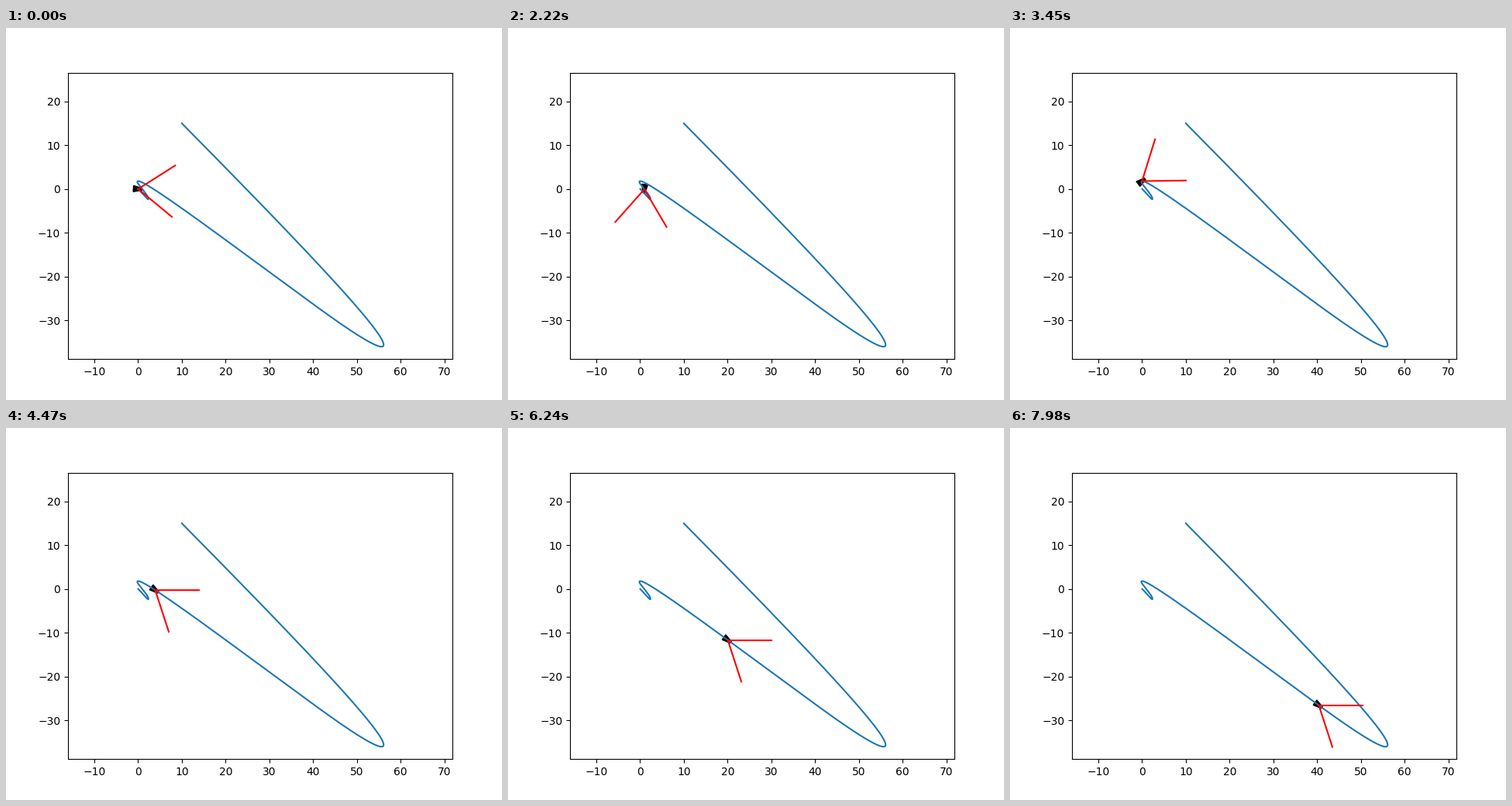
Recreate the animation shown at these times as a matplotlib script. Size 640x480 px, loop 8 s.

```python
import numpy as np
import matplotlib.pyplot as plt
from matplotlib.animation import FuncAnimation

STEP = 30            # the pose changes every 30 ms
TICK = 20            # timer interval in ms
LOOP = 8000
VIEW = 10.0          # length of the view rays
HALF = np.radians(36)

# few key poses: time (s), x, y, and velocity there
KEYS = np.array([
    (0.00, 0.03, 0.00, 2.6, -2.6),
    (1.14, 2.38, -2.27, 0.0, 1.4),
    (3.45, 0.00, 1.80, 1.2, 0.2),
    (8.00, 40.64, -26.77, 11.4, -8.3),
    (16.00, 10.00, 15.00, -16.7, 16.9),
])

# robot outline in its own frame, nose along +x
BODY = np.array([(-1.1, 0.7), (0.85, 0.22), (0.85, -0.22), (-1.1, -0.7)])


def place(s):
    """Position on the cubic between the two key poses around time s."""
    i = np.clip(np.searchsorted(KEYS[:, 0], s, side="right") - 1,
                0, len(KEYS) - 2)
    a, b = KEYS[i], KEYS[i + 1]
    h = b[..., :1] - a[..., :1]
    u = (np.asarray(s)[..., None] - a[..., :1]) / h
    p, v, q, w = a[..., 1:3], a[..., 3:], b[..., 1:3], b[..., 3:]
    ease = u * u * (3 - 2 * u)
    return (p + (q - p) * ease
            + h * u * (1 - u) * ((1 - u) * v - u * w))


def heading(s):
    """Settle near -57 degrees, then swing clockwise by almost a full turn."""
    u = np.clip((s - 1.69) / 2.51, 0, 1)
    settle = -57 + 53.4 * np.exp(-2.2 * s)
    return np.radians(settle - 339 * u * u * (3 - 2 * u))


fig, ax = plt.subplots(figsize=(6.4, 4.8), dpi=100)
ax.set_xlim(-16.012, 71.853)
ax.set_ylim(-38.884, 26.59)
ax.plot(*place(np.linspace(0, KEYS[-1, 0], 1600)).T, color="tab:blue")
body, = ax.fill(*BODY.T, color="black", lw=1)
rays = [ax.plot([], [], color="red")[0] for _ in range(2)]


def draw(k):
    s = (TICK * k + TICK // 2) // STEP * STEP / 1000
    x, y = place(s)
    a = heading(s)
    c, n = np.cos(a), np.sin(a)
    body.set_xy(BODY @ np.array([(c, n), (-n, c)]) + (x, y))
    for ray, side in zip(rays, (HALF, -HALF)):
        ray.set_data([x, x + VIEW * np.cos(a + side)],
                     [y, y + VIEW * np.sin(a + side)])
    return [body, *rays]


anim = FuncAnimation(fig, draw, frames=LOOP // TICK, interval=TICK,
                     repeat=True, repeat_delay=0)
plt.show()
```
